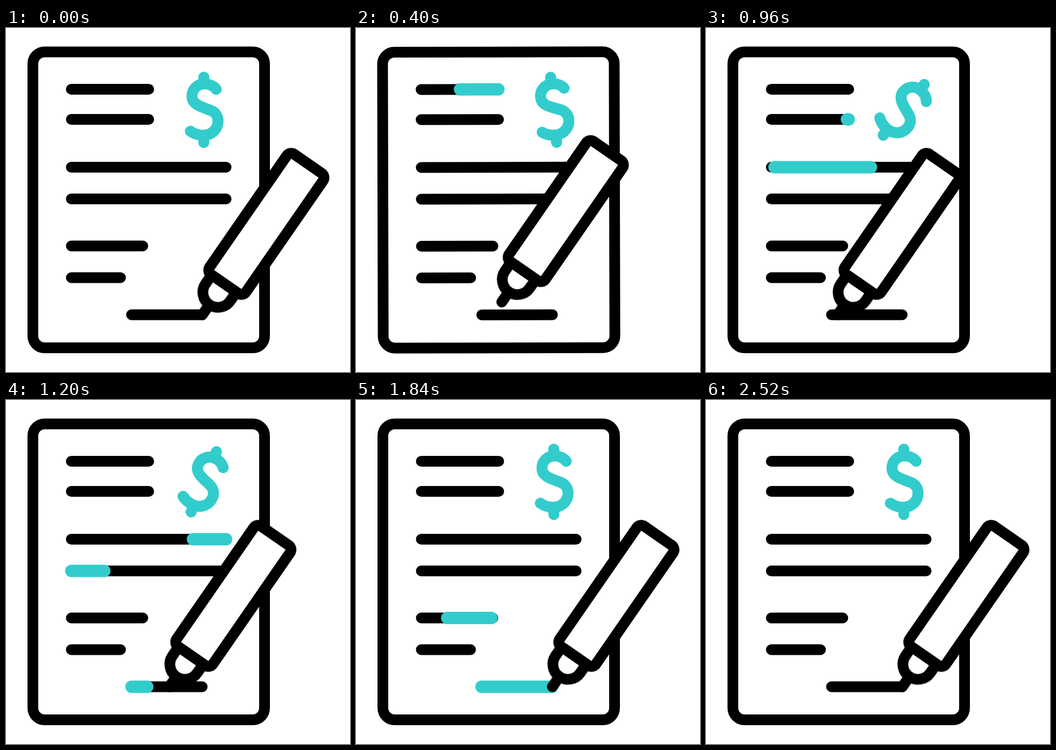
Animation of 640x640 px, one loop 2600 ms. Source, as an HTML page:

```html
<!DOCTYPE html>
<html lang="en">
<head>
<meta charset="utf-8">
<title>Signing an invoice</title>
<style>
  @property --from { syntax: "<length>"; inherits: false; initial-value: 0px; }
  @property --to { syntax: "<length>"; inherits: false; initial-value: 0px; }
  @property --turn { syntax: "<angle>"; inherits: false; initial-value: 0deg; }

  html, body { margin: 0; width: 100%; height: 100%; overflow: hidden; background: #fff; }

  svg {
    --loop: 2600ms;
    --sine: cubic-bezier(.37, 0, .63, 1);
    display: block; width: 100%; height: 100%;
    fill: none; stroke: #000; stroke-width: 20;
    stroke-linecap: round; stroke-linejoin: round;
  }

  .page, .dollar { transform: rotate(var(--turn)); }
  .page { transform-origin: 320px 320px; animation: sway var(--loop) var(--sine) infinite; }
  .dollar { stroke: #3cc; stroke-width: 20.5; transform-origin: 368px 152px; animation: swing var(--loop) var(--sine) infinite; }
  .slide { animation: slide var(--loop) var(--sine) infinite; }
  .lift { animation: lift var(--loop) var(--sine) infinite; }
  .pen { fill: #fff; }

  /* A highlight is the part of its line between --from and --to, in percent. */
  .mark line {
    stroke: #3cc; stroke-width: 23;
    stroke-dasharray: calc(var(--to) - var(--from)) 300px;
    stroke-dashoffset: calc(0px - var(--from));
    animation: tail var(--loop) var(--sine) infinite,
               head var(--loop) var(--sine) infinite,
               show var(--loop) step-end infinite;
    animation-delay: calc(var(--at) - var(--loop));
  }
  .mark .sign { animation-name: sign-tail, sign-head, sign-show; --at: 0ms; }

  @keyframes sway {
    0%, 33.5%, 100% { --turn: 0deg; }
    10% { --turn: 2.1deg; }
    21.9% { --turn: -3.1deg; }
  }
  @keyframes swing {
    0%, 57%, 100% { --turn: 0deg; }
    13.1% { --turn: -6deg; }
    37.5% { --turn: 39deg; }
  }
  @keyframes slide {
    0%, 60%, 100% { transform: translateX(0); }
    24.5%, 30.8% { transform: translateX(-134.5px); }
  }
  @keyframes lift {
    0%, 24.5%, 100% { transform: translateY(0); }
    12.3% { transform: translateY(-28px); }
  }

  @keyframes head { 0% { --to: 0px; } 15.4%, 100% { --to: 100px; } }
  @keyframes tail { 0%, 7.7% { --from: 0px; } 23.08%, 100% { --from: 100px; } }
  @keyframes show { 0% { opacity: 0; } .5% { opacity: 1; } 23.05%, 100% { opacity: 0; } }

  @keyframes sign-head { 0%, 38.8% { --to: 0px; } 62.3%, 100% { --to: 100px; } }
  @keyframes sign-tail { 0%, 81.5% { --from: 0px; } 96.92%, 100% { --from: 100px; } }
  @keyframes sign-show { 0% { opacity: 0; } 39.3% { opacity: 1; } 96.9%, 100% { opacity: 0; } }
</style>
</head>
<body>
<svg viewBox="0 0 640 640">
  <g class="page">
    <rect x="50" y="44.5" width="431" height="550.5" rx="22"/>
    <path d="M121.5 114H265.5M121.5 170H265.5M121.5 259H409.5M121.5 318H409.5M121.5 405.5H254.5M121.5 464.5H213M233.5 533.5H365"/>
    <path class="dollar" d="M391 114C386 107 377 104 369 104C356 104 346 114 346 127C346 143 365 147 380 153C389 156 394.5 164 394.5 173C394.5 188 383 199.5 367 199.5C358 199.5 350 197 343 192M368 91.5V104M368 199.5V213"/>
    <g class="mark">
      <line pathLength="100" x1="121.5" y1="114" x2="265.5" y2="114" style="--at: 0ms"/>
      <line pathLength="100" x1="121.5" y1="170" x2="265.5" y2="170" style="--at: 400ms"/>
      <line pathLength="100" x1="121.5" y1="259" x2="409.5" y2="259" style="--at: 724ms"/>
      <line pathLength="100" x1="121.5" y1="318" x2="409.5" y2="318" style="--at: 1078ms"/>
      <line pathLength="100" x1="121.5" y1="405.5" x2="254.5" y2="405.5" style="--at: 1476ms"/>
      <line pathLength="100" x1="121.5" y1="464.5" x2="213" y2="464.5" style="--at: 1920ms"/>
      <line class="sign" pathLength="100" x1="233.5" y1="533.5" x2="365" y2="533.5"/>
    </g>
  </g>
  <g class="slide">
    <g class="lift">
      <g class="pen" transform="translate(484.4 364.4) rotate(34.7)">
        <path d="M-1.6 184V207"/>
        <path d="M-29.6 136V156A28 28 0 0 0 26.4 156V136"/>
        <rect x="-41" y="-136" width="82" height="272" rx="10"/>
      </g>
    </g>
  </g>
</svg>
</body>
</html>
```
